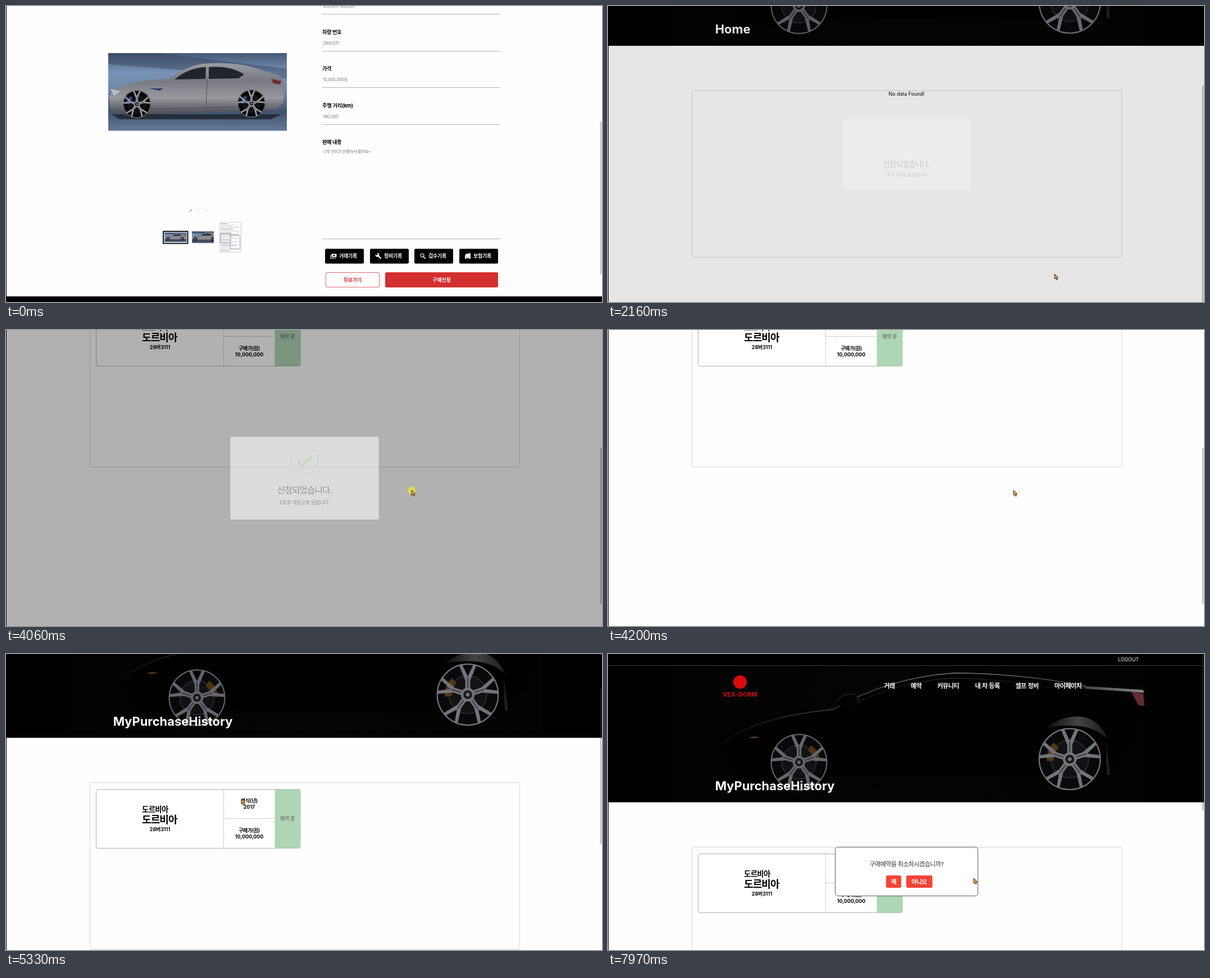
Animation of 1061x528 px, one loop 8000 ms. Source, as an HTML page with a canvas:

```html
<!DOCTYPE html>
<html lang="ko">
<head>
<meta charset="utf-8">
<style>
html, body { margin: 0; width: 100%; height: 100%; overflow: hidden; background: #fff; }
canvas { display: block; width: 1061px; height: 528px; }
</style>
</head>
<body>
<canvas id="stage" width="1061" height="528"></canvas>
<script>
const c = document.getElementById('stage').getContext('2d');
const W = 1061, H = 528, LOOP = 8000;
const FONT = 'Inter, "Noto Sans CJK KR", "Noto Sans CJK JP", sans-serif';
const MAKER = '도르비아', PLATE = '28버3111';
const RED = '#d32f2f';

const clamp = v => Math.max(0, Math.min(1, v));
const smooth = v => v * v * (3 - 2 * v);

// Keys are [time, ...values]; eases from each key to the next.
function track(keys, t) {
  const i = keys.findIndex(k => k[0] > t);
  if (i < 0) return keys.at(-1).slice(1);
  if (i === 0) return keys[0].slice(1);
  const a = keys[i - 1], b = keys[i], p = smooth((t - a[0]) / (b[0] - a[0]));
  return a.slice(1).map((v, j) => v + (b[j + 1] - v) * p);
}

function at(x, y, scale, draw) {
  c.save();
  c.translate(x, y);
  c.scale(scale, scale);
  draw();
  c.restore();
}

// y is the optical middle of the line; only the share of Hangul is tightened.
function text(str, x, y, size, { color = '#000', weight = 400, align = 'left', gap = -0.05 } = {}) {
  const hangul = (str.match(/[가-힣]/g) || []).length / str.length;
  c.font = `${weight} ${size}px ${FONT}`;
  c.letterSpacing = gap * size * hangul + 'px';
  c.textAlign = align;
  c.fillStyle = color;
  c.fillText(str, x, y + 0.36 * size);
}

function rect(x, y, w, h, r, fill, stroke) {
  c.beginPath();
  c.roundRect(x, y, w, h, r);
  if (fill) { c.fillStyle = fill; c.fill(); }
  if (stroke) { c.strokeStyle = stroke; c.lineWidth = 1; c.stroke(); }
}

function circle(x, y, r, fill, stroke, width = 1) {
  c.beginPath();
  c.arc(x, y, r, 0, 7);
  if (fill) { c.fillStyle = fill; c.fill(); }
  if (stroke) { c.strokeStyle = stroke; c.lineWidth = width; c.stroke(); }
}

function shape(d, fill, stroke, width = 1) {
  const p = new Path2D(d);
  if (fill) { c.fillStyle = fill; c.fill(p); }
  if (stroke) { c.strokeStyle = stroke; c.lineWidth = width; c.stroke(p); }
}

function gradient(x0, y0, x1, y1, ...colors) {
  const g = c.createLinearGradient(x0, y0, x1, y1);
  colors.forEach((color, i) => g.addColorStop(i / (colors.length - 1), color));
  return g;
}

function wheel(x, y, r, metal, caliper, side) {
  at(x, y, r / 50, () => {
    circle(0, 0, 50, '#08090a');
    circle(0, 0, 30, '#101214', '#25282b', 2);
    c.beginPath();
    c.arc(0, 0, 31, side - 0.45, side + 0.45);
    c.strokeStyle = caliper;
    c.lineWidth = 11;
    c.stroke();
    circle(0, 0, 48.5, null, metal, 2);
    for (let i = 0; i < 5; i++) {
      c.rotate(Math.PI * 0.4);
      shape('M-4 -8 L-4 -23 L-14 -47 L-9 -48 L0 -29 L9 -48 L14 -47 L4 -23 L4 -8Z', metal);
      shape('M0 -10 V-28', null, 'rgba(0,0,0,.45)', 2);
    }
    circle(0, 0, 11, metal);
    circle(0, 0, 7, '#17191b');
    circle(0, 0, 3, metal);
  });
}

function silverCar() {
  c.save();
  c.beginPath();
  c.rect(0, 0, 318, 138.5);
  c.clip();
  c.fillStyle = gradient(0, 0, 0, 139, '#465a76', '#7893b6', '#6f86a6', '#40536e', '#657b98');
  c.fillRect(0, 0, 318, 139);
  shape('M0 0 L90 0 L318 28 L318 45 L0 20Z', 'rgba(40,54,75,.35)');
  shape('M5 109 H309 L290 118 H20Z', '#242d3a');
  shape('M2 78 Q8 62 40 54 Q75 46 108 46 Q140 22 170 19 Q225 14 270 29 L307 41 Q314 52 312 88 L300 101 L30 111 L4 100Z',
    gradient(0, 18, 0, 110, '#9a9ca1', '#777a80', '#96989e', '#45484e'));
  shape('M118 47 Q143 26 174 25 L173 46Z M179 25 Q217 22 242 38 L232 45 L179 46Z', '#20242b');
  shape('M4 64 L22 68 L10 76Z', '#b9c1cc');
  shape('M290 46 L308 50 L306 56 L294 54Z', '#6d2a2a');
  shape('M176 46 L174 98 M76 100 L228 96', null, '#4a4d53');
  shape('M72 63 H98 L92 67Z', '#253a6b');
  wheel(51, 91, 25, '#9b9ea5', '#34478c', 3.6);
  wheel(255, 90, 25, '#9b9ea5', '#34478c', 3.6);
  c.restore();
}

function documentThumb() {
  rect(380.5, 385.5, 38, 54, 0, '#fafafa', '#d4d4d4');
  for (let i = 0; i < 16; i++) {
    c.fillStyle = i % 3 ? '#b9bdc4' : '#7f858d';
    c.fillRect(382, 388 + i * 3.2, 12 + (i * 11) % 23, 0.8);
  }
  rect(381.5, 405.5, 18, 17, 0, null, '#9da5b0');
  rect(399.5, 409.5, 17, 24, 0, null, '#9da5b0');
}

function iconButton(x, label, drawIcon) {
  rect(x, 433, 69, 26.5, 2.5, '#000');
  at(x + 15, 446, 1, drawIcon);
  text(label, x + 25, 446, 8.8, { color: '#fff', weight: 600, gap: -0.01 });
}

function detailPage() {
  c.fillStyle = '#fefefe';
  c.fillRect(0, 0, W, H);
  at(182, 84, 1, silverCar);
  [328, 341, 355].forEach((x, i) => {
    c.beginPath();
    c.arc(x - 0.5, 363.5, 2.6, -0.5, 2);
    c.strokeStyle = i ? '#d0d0d0' : '#666';
    c.lineWidth = 1;
    c.stroke();
  });
  rect(279, 401, 45.5, 23.5, 1, '#10151c');
  rect(281, 403, 41.5, 19.5, 0, '#fff');
  at(282, 404, 0.125, silverCar);
  c.save();
  c.beginPath();
  c.rect(331, 402, 39, 21);
  c.clip();
  at(329, 402, 0.155, silverCar);
  c.restore();
  documentThumb();

  const fields = [['', `${MAKER} / ${MAKER}`], ['차량 번호', PLATE], ['가격', '10,000,000원'], ['주행 거리(km)', '190,000']];
  fields.forEach(([label, value], i) => {
    const y = 14.5 + i * 65.5;
    text(label, 563, y - 33.5, 9.2, { weight: 700 });
    text(value, 564.5, y - 14, 7.1, { color: '#707070' });
    c.fillStyle = '#b4b4b4';
    c.fillRect(563, Math.floor(y), 317, 1);
  });
  text('판매 내용', 563, 243, 9.2, { weight: 700 });
  text('너무 연비가 안좋아서 팔아요~', 564.5, 259, 7.1, { color: '#707070' });
  c.fillStyle = '#b4b4b4';
  c.fillRect(563, 415, 317, 1);

  iconButton(568, '거래기록', () => {
    rect(-3.5, -4, 9, 6, 1, '#fff');
    circle(1, -1, 1.6, '#000');
    shape('M-5 -2 V4 H4', null, '#fff', 1.1);
  });
  iconButton(648, '정비기록', () => {
    shape('M-1 -1 L4.5 4.5', null, '#fff', 2.4);
    shape('M-5 -3 L-3 -1 L-1 -3 L-3 -5 Q1 -6 1.5 -2 Q1 2 -3 1.5 Q-6 0 -5 -3Z', '#fff');
  });
  iconButton(727, '검수기록', () => {
    circle(-1, -1, 3, null, '#fff', 1.2);
    shape('M1.3 1.3 L5 5', null, '#fff', 1.5);
  });
  iconButton(807, '보험기록', () => {
    shape('M-5 5 V0 L-3.5 -4 H1 V-1 H5 V5 H3 V4 H-3 V5Z', '#fff');
    circle(3, -3, 2.3, '#fff');
    circle(-2.5, 2, 0.8, '#000');
    circle(2.5, 2, 0.8, '#000');
  });
  rect(569.5, 475.5, 95, 26, 2.5, '#fff', '#dc6a6a');
  text('뒤로가기', 617, 488.5, 8.8, { color: RED, weight: 600, align: 'center', gap: 0 });
  rect(675, 475, 201, 27, 2.5, RED);
  text('구매신청', 775.5, 488.5, 8.8, { color: '#fff', weight: 600, align: 'center', gap: 0 });
  c.fillStyle = '#000';
  c.fillRect(0, 518, W, 10);
  scrollbar(206, 273);
}

function hero(title) {
  c.fillStyle = '#000';
  c.fillRect(0, 0, W, 264.5);
  c.fillStyle = gradient(108, 0, 956, 0, '#020203', '#040405', '#020202');
  c.fillRect(108, 21, 848, 243);
  shape('M202 165 Q245 125 400 99 Q500 42 615 34 Q760 35 955 65 V92 L925 170 L892 217 H410 L235 232Z', '#010101');
  shape('M204 160 Q262 112 400 99 Q500 42 615 34 Q730 34 850 57', null,
    gradient(204, 0, 850, 0, '#0c0c0c', '#333', '#4a4a4a', '#777', '#666', '#444'), 1.3);
  shape('M430 92 Q520 49 610 43 Q710 44 800 62', null, gradient(430, 0, 800, 0, '#1c1c1c', '#333', '#111'));
  shape('M405 86 Q420 67 441 72 L450 91 L432 107Z', '#020202');
  shape('M405 86 Q420 67 441 72 L448 88', null, '#333');
  shape('M845 57 L952 64 L955 69 L850 62Z', gradient(845, 0, 955, 0, '#444', '#888'));
  shape('M931 67 L953 70 L955 92 L945 92Z', '#642b30');
  shape('M251 149 Q260 145 271 149 L258 151Z', '#4a3319');
  shape('M781 132 Q812 106 850 113 Q875 120 889 150 L873 139 Q840 121 781 132Z', gradient(781, 0, 889, 0, '#0c0c0c', '#444', '#1c1c1c'));
  shape('M886 157 L894 215 L888 216Z', '#202022');
  wheel(340, 193, 51, '#63666a', '#4d3212', -0.5);
  wheel(822, 187.5, 56, '#717478', '#563714', 3.5);

  c.fillStyle = '#3c3c3c';
  c.fillRect(0, 20, W, 1);
  text('LOGOUT', 926.5, 10, 8.8, { color: '#fff', align: 'center' });
  circle(235, 50, 12, '#d60c0c');
  text('VEX-DORM', 235, 72, 11, { color: '#d60c0c', weight: 700, align: 'center' });
  [['거래', 501], ['예약', 548.5], ['커뮤니티', 605.5], ['내 차 등록', 675.5], ['셀프 정비', 746], ['마이페이지', 819]]
    .forEach(([label, x]) => text(label, x, 57, 11.1, { color: '#fff', weight: 600, align: 'center' }));
  text(title, 190.7, 235, 21.9, { color: '#fff', weight: 700 });
}

function dashed(x0, y0, x1, y1) {
  c.setLineDash([2, 1.5]);
  shape(`M${x0} ${y0} L${x1} ${y1}`, null, '#aaa');
  c.setLineDash([]);
}

function purchaseCard() {
  const bold = { weight: 700, align: 'center' };
  rect(160.5, 356.5, 363.5, 105, 3, '#fff', '#aeaeae');
  rect(478.5, 356.5, 45.5, 105, [0, 3, 3, 0], '#aed6b4');
  dashed(387.5, 357, 387.5, 461);
  dashed(388, 408.5, 478, 408.5);
  text(MAKER, 242, 392, 13.4, { weight: 600 });
  text(MAKER, 242, 411, 18, { weight: 700 });
  text(PLATE, 274, 427.5, 8.9, bold);
  text('연식(년)', 433, 377, 8.9, bold);
  text('2017', 433, 388, 8.9, bold);
  text('구매가(원)', 433, 429.5, 8.9, bold);
  text('10,000,000', 433, 440.5, 8.9, bold);
  text('예약 중', 501, 408.5, 9.1, { ...bold, weight: 600, color: '#7d8480' });
}

function historyPage(scroll, loaded) {
  c.fillStyle = '#fefefe';
  c.fillRect(0, 0, W, H);
  at(0, -scroll, 1, () => {
    hero(loaded ? 'MyPurchaseHistory' : 'Home');
    rect(149.5, 344.5, 765, 297, 2, null, '#d4d4d4');
    if (loaded) purchaseCard();
    else text('No data Found!', 531.5, 350, 8.85, { align: 'center' });
  });
  const height = loaded ? 999 : 722;
  scrollbar(scroll * H / height, H * H / height);
}

function scrollbar(y, h) {
  rect(1057.5, y, 3, h, 1.5, 'rgba(70,70,70,.3)');
}

function successModal(t) {
  const opening = clamp((t - 2122) / 300), closing = clamp((t - 4030) / 70);
  const dim = 0.4 * Math.min(clamp((t - 2140) / 90), 1 - clamp((t - 4030) / 133));
  c.fillStyle = `rgba(0,0,0,${dim})`;
  c.fillRect(0, 0, W, H);
  if (!opening || closing === 1) return;

  const pop = opening < 0.45 ? 0.7 + 0.35 * opening / 0.45
    : opening < 0.8 ? 1.05 - 0.1 * (opening - 0.45) / 0.35
    : 0.95 + 0.05 * (opening - 0.8) / 0.2;
  c.globalAlpha = clamp(opening / 0.5) * (1 - closing);
  at(531.5, 264.3, pop * (1 - 0.15 * closing), () => {
    rect(-141.5, -79, 283, 158, 3, '#fff');
    if (t > 2180) {
      circle(0, -33.5, 25.5, null, 'rgba(165,200,140,.38)', 2.2);
      c.setLineDash([42 * smooth(clamp((t - 2330) / 420)), 60]);
      if (t > 2340) shape('M-13.2 -32 L-4.8 -23.5 L14.4 -42.5', null, '#a5dc86', 3.5);
      c.setLineDash([]);
    }
    text('신청되었습니다.', 0, 23, 16.4, { color: '#595959', weight: 500, align: 'center' });
    text('2초후 자동으로 닫힙니다.', 0, 46.5, 9.5, { color: '#545454', align: 'center' });
  });
  c.globalAlpha = 1;
}

function cancelDialog() {
  const button = { color: '#fff', weight: 600, align: 'center' };
  rect(404.5, 344.5, 254, 87, 5, '#fff', '#5c5c5c');
  text('구매예약을 취소하시겠습니까?', 531.5, 375.5, 10.9, { color: '#333', align: 'center' });
  rect(495, 395, 27, 22, 3, '#f44336');
  rect(531, 395, 46.5, 22, 3, '#f44336');
  text('예', 508.5, 406, 10.5, button);
  text('아니오', 554, 406, 10.5, button);
}

const POINTER = [
  [70, 946, 427], [850, 833, 498], [1060, 797, 486], [1940, 797, 486], [2160, 795, 478],
  [2740, 628, 300], [3000, 540, 170], [3250, 412, 220], [3450, 500, 290], [3620, 628, 300],
  [4000, 722, 286], [4440, 722, 286], [4860, 724, 297], [5330, 419, 259], [6070, 240, 52],
  [6140, 237, 51], [6260, 240, 54], [6520, 240, 54], [6950, 548, 370], [7280, 503, 406],
  [7360, 503, 406], [7600, 685, 512], [7940, 651, 400]
];
const SCROLL = [[4440, 397], [4860, 225], [5330, 115], [6040, 0]];
const CLICKS = [[1780, 1940], [4020, 4150], [7290, 7400]];

function pointer(t) {
  if (t < 70) return;
  const [x, y] = track(POINTER, t);
  if (CLICKS.some(([from, to]) => t >= from && t < to)) circle(x, y, 7, 'rgba(226,226,60,.8)');
  const overButton = t < 2090 && x > 675 && x < 876 && y > 475;
  const overLogo = t > 6000 && t < 6700 && x < 271 && y < 78;
  const overStatus = t > 6700 && t < 7430 && x > 478 && x < 524 && y > 356;
  at(x, y, 1, () => {
    c.lineJoin = 'round';
    if (overButton || overLogo || overStatus) {
      shape('M-1 0 Q1 -1 1.5 1 L2 4 L5 5 Q6 6 5.5 9 L4.5 12 H-1 L-4 8 Q-4 6 -2 7Z', '#f2bd3c', '#4a3212', 0.8);
    } else {
      shape('M0 0 V9 L2 7.2 L3.6 10.5 L5.4 9.7 L4 6.5 H6.6Z', '#e9a544', '#3b2614', 1);
    }
  });
}

function draw(t) {
  c.clearRect(0, 0, W, H);
  if (t < 2090) detailPage();
  else {
    const loaded = t >= 2290;
    historyPage(loaded ? track(SCROLL, t)[0] : 193.5, loaded);
    successModal(t);
    if (t >= 7430) cancelDialog();
  }
  pointer(t);
  c.fillStyle = '#000';
  c.fillRect(0, 0, 1, H);
}

const start = performance.now();
function frame() {
  draw((performance.now() - start) % LOOP);
  requestAnimationFrame(frame);
}
frame();
</script>
</body>
</html>
```
